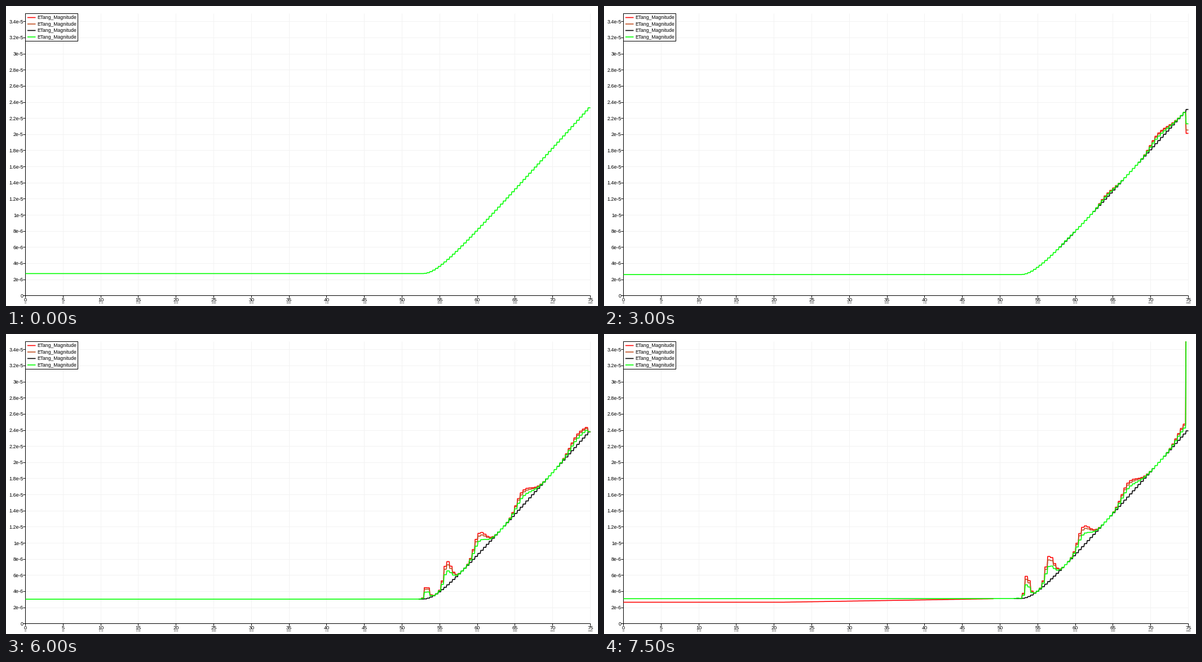
A matplotlib script that plays this animation: 1050 px wide and 533 px high, repeating every 8 s.

```python
import numpy as np
import matplotlib.pyplot as plt
from matplotlib.animation import FuncAnimation
from matplotlib.patches import Rectangle

W, H, DPI = 1050, 533, 100
LEFT, RIGHT, TOP, BASE = 34.5, 1036.5, 13.5, 514.8
X_UNIT = (RIGHT - LEFT) / 75
Y_UNIT = 14.325                      # pixels per 1e-6
CELLS, FRAMES = 200, 16
PX = 72 / DPI
COLORS = ["#ff0000", "#bf4d1f", "#000000", "#00ff00"]
SHARE = [1, 0.86, 0, 0.6]            # how strongly each curve follows the ripples
DRIFT = [0, 0.22, 0, 0.13]           # how far each leaves the flat level
REST = 2.72

xc = (np.arange(CELLS) + 0.5) * 75 / CELLS


def level_shift(i):
    """Growing oscillation of the flat level, limited upwards."""
    size = 0.06 + np.exp(0.48 * (i - 13))
    return min(size * np.cos(2 * np.pi * (i - 15) / 3.6), 0.41)


def ripples(i):
    """Bumps that appear from the right and narrow towards the foot."""
    total = np.zeros(CELLS)
    shift = np.interp(i, [10, 13], [-0.05, 0.35])
    for n in range(6):
        s = abs(0.88 * n + shift)
        center = 52 + s * s
        grown = 1 / (1 + np.exp((13 - 1.5 * n - i) / 0.75))
        height = 7.5 * np.exp(-0.38 * s) * (1 - np.exp(-(s / 1.3) ** 2))
        width = np.where(xc < center, 0.3, 0.42) * s
        total += grown * height * np.exp(-((xc - center) / width) ** 2)
    return total


def end_swing(i):
    """Relative jump of the last cell."""
    size = np.interp(i, [2, 3, 6, 9], [0, 0.32, 0.47, 0.94])
    turn = np.interp(i, [3.6, 5.3, 7, 15], [0, 1, 2, 6])
    return size * np.cos(np.pi * turn)


def curves(i):
    dev = level_shift(i)
    d = np.clip(xc - 52.7, 0, None)
    base = REST + dev + 1.04 * (1 + 0.03 * dev) * (np.hypot(d, 2.5) - 2.5)
    fade = np.clip((51 - xc) / 30, 0, 1)
    bump = ripples(i)

    out = []
    for n in range(4):
        v = base + SHARE[n] * bump - DRIFT[n] * dev * abs(dev) * fade
        if n == 0:
            v -= 0.46 * np.exp(i - 15) * fade
        v[-1] = base[-1] * (1 + SHARE[n] * end_swing(i))
        out.append(v)
    return out


def covered(v, upper):
    """Cells where v and its neighbours lie under a later curve."""
    same = np.zeros(CELLS, bool)
    for u in upper:
        near = np.pad(np.abs(u - v) < 0.03, 1, constant_values=True)
        same |= near[:-2] & near[1:-1] & near[2:]
    return same


def px(x):
    return LEFT + X_UNIT * x


def py(v):
    return BASE - Y_UNIT * v


def crisp(p):
    return np.floor(p) + 0.5


# each cell is a flat run joined to the next by a one-pixel ramp
edges = px(np.arange(CELLS + 1) * 75 / CELLS)
step_x = np.column_stack([edges[:-1] + 1, edges[1:]]).ravel()
step_x[0] = LEFT

fig = plt.figure(figsize=(W / DPI, H / DPI), dpi=DPI, facecolor="white")
ax = fig.add_axes([0, 0, 1, 1])
ax.set_xlim(0, W)
ax.set_ylim(H, 0)
ax.axis("off")


def rule(xs, ys, color="black", width=1, z=1):
    ax.plot(xs, ys, color=color, lw=width * PX, zorder=z,
            solid_capstyle="butt", snap=False)


def label(x, y, text, size, ha, z=2):
    return ax.text(x, y, text, fontsize=size * PX, family="Liberation Sans",
                   ha=ha, va="baseline", color="black", zorder=z)


floor_y = crisp(BASE)
strip = Rectangle((0, 526), W, 1.5, transform=ax.transData)
for x in range(0, 80, 5):
    gx = crisp(px(x))
    rule([gx, gx], [TOP, floor_y], "#f2f2f2", z=0)
    rule([gx, gx], [floor_y, floor_y + 4])
    label(px(x), 525.2, str(x), 9.2, "center")
    cut = label(px(x), 533, str(x), 9.2, "center")
    cut.set_clip_on(True)
    cut.set_clip_path(strip)

for v in range(0, 36, 2):
    gy = crisp(py(v))
    rule([LEFT, RIGHT], [gy, gy], "#f2f2f2", z=0)
    rule([LEFT - 4, LEFT], [gy, gy])
    name = f"{v / 10:g}e-5" if v >= 10 else f"{v}e-6" if v else "0"
    label(31, py(v) + 3, name, 9, "right")

rule([LEFT, LEFT], [TOP, floor_y])
rule([LEFT, RIGHT], [floor_y, floor_y])

plot_box = Rectangle((LEFT - 0.5, TOP - 0.5), RIGHT - LEFT + 1, BASE - TOP + 1,
                     transform=ax.transData)
lines = []
for n, color in enumerate(COLORS):
    line, = ax.plot([], [], color=color, lw=1.6 * PX, zorder=3 + n, snap=False,
                    solid_joinstyle="round", solid_capstyle="butt")
    line.set_clip_path(plot_box)
    lines.append(line)

ax.add_patch(Rectangle((LEFT, TOP), 93, 49, fc="white", ec="black",
                       lw=PX, zorder=8, snap=False))
for n, color in enumerate(COLORS):
    y = 20.5 + 11.5 * n
    rule([38, 52.5], [y, y], color, 1.6, z=9)
    label(55, y + 2.7, "ETang_Magnitude", 8.6, "left", z=9)


def draw(i):
    values = curves(i)
    for n, line in enumerate(lines):
        v = np.where(covered(values[n], values[n + 1:]), np.nan, values[n])
        line.set_data(step_x, py(np.repeat(v, 2)))
    return lines


anim = FuncAnimation(fig, draw, frames=FRAMES, init_func=lambda: draw(0),
                     interval=500, repeat=True, blit=False)
plt.show()
```
